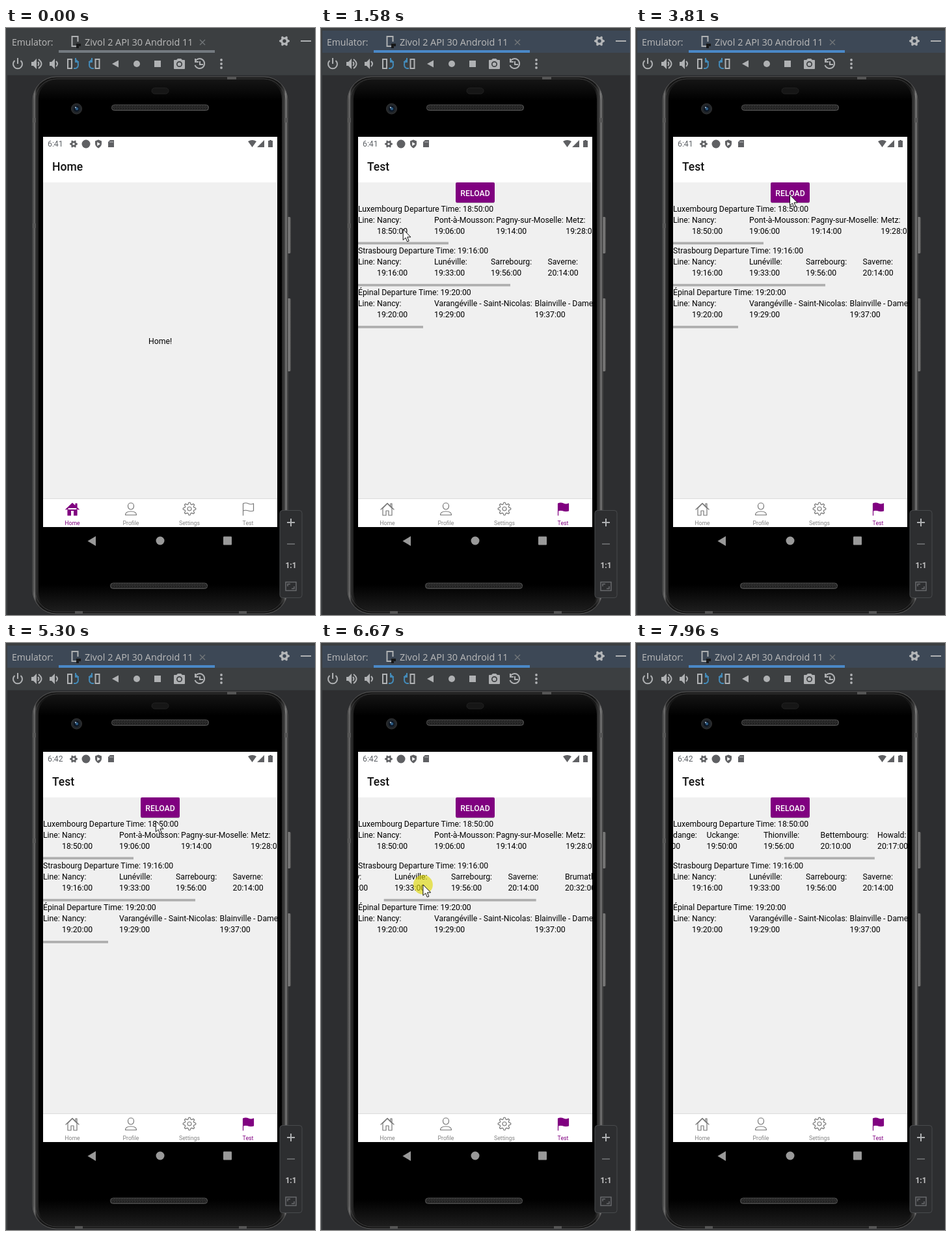
An HTML page for the animation above (8000 ms loop, 475 by 901 pixels).

```html
<!DOCTYPE html>
<html lang="en">
<head>
<meta charset="utf-8">
<title>Emulator</title>
<style>
  html, body { margin: 0; width: 100%; height: 100%; overflow: hidden; background: #2d2e30; }
  svg { display: block; }
  text { font-family: Roboto, sans-serif; font-size: 12.25px; white-space: pre; }
  .ide { font-family: "Open Sans", sans-serif; font-size: 14.4px; fill: #bbb; }
  .title { font-size: 17.5px; font-weight: 500; fill: #111; }
  .mid { text-anchor: middle; }
  .tab text { font-size: 8.75px; fill: #848484; text-anchor: middle; }
  .tab .icon { fill: none; stroke: #777; stroke-width: 1.2; stroke-linejoin: round; stroke-linecap: round; }
  .tab .hole { fill: #fff; stroke: none; display: none; }
  .tab.active text { fill: #800080; }
  .tab.active .icon { fill: #800080; stroke: #800080; }
  .tab.active .hole { display: block; }
  .line { fill: none; stroke: #afb1b3; stroke-width: 2; }
</style>
</head>
<body>
<svg id="stage" width="475" height="901" viewBox="0 0 475 901">
  <defs>
    <linearGradient id="rim">
      <stop offset="0" stop-color="#252525"/><stop offset=".007" stop-color="#777"/>
      <stop offset=".014" stop-color="#2b2b2b"/><stop offset=".03" stop-color="#161616"/>
      <stop offset=".97" stop-color="#161616"/><stop offset=".986" stop-color="#3a3a3a"/>
      <stop offset=".993" stop-color="#888"/><stop offset="1" stop-color="#252525"/>
    </linearGradient>
    <linearGradient id="glass" x2="0" y2="1">
      <stop offset="0" stop-color="#151515"/><stop offset=".04" stop-color="#000"/>
      <stop offset=".95" stop-color="#000"/><stop offset="1" stop-color="#1d1d1d"/>
    </linearGradient>
    <linearGradient id="key">
      <stop offset="0" stop-color="#333"/><stop offset=".6" stop-color="#858585"/><stop offset="1" stop-color="#444"/>
    </linearGradient>
    <pattern id="mesh" width="4" height="4.5" patternUnits="userSpaceOnUse">
      <path d="M0 0L2 2.25L0 4.5M2 0L4 2.25L2 4.5" fill="none" stroke="#666" stroke-width=".8"/>
    </pattern>
    <clipPath id="screen"><rect x="57" y="167" width="360" height="599"/></clipPath>
  </defs>

  <!-- tool window -->
  <rect width="475" height="73" fill="#3c3f41"/>
  <rect y="73" width="2" height="828" fill="#3c3f41"/>
  <rect id="header" x="2" y="4" width="473" height="34"/>
  <rect id="underline" x="81" y="34" width="240" height="4"/>
  <path d="M2 72.5H475" stroke="#323537"/>
  <text class="ide" x="9" y="27" style="font-size:14px">Emulator:</text>
  <text class="ide" x="121" y="27">Zivol 2 API 30 Android 11</text>
  <path d="M108 28H101.500V13H110.500V21" class="line" stroke-width="1.6"/>
  <path d="M108 24h7v4h-3v3h-4z" fill="#18191a"/>
  <path d="M298 18l8 8m0-8l-8 8" stroke="#73777a" stroke-width="1.3"/>
  <g id="options" transform="translate(428 20)" fill="#b4b6b8"></g>
  <path d="M453 20H469" class="line"/>

  <!-- emulator toolbar -->
  <path d="M13.500 50a7 7 0 1 0 9 0M18 46V55" class="line"/>
  <g fill="#afb1b3">
    <path id="speaker" d="M39 52h3l5-5v16l-5-5h-3z"/>
    <use href="#speaker" x="28"/>
    <path d="M173 49.500v11l-10-5.500z"/>
    <circle cx="201" cy="55" r="5"/>
    <rect x="228" y="50" width="10" height="10"/>
    <path d="M259 49h3l2-2h5l2 2h3a1 1 0 0 1 1 1v12a1 1 0 0 1-1 1h-15a1 1 0 0 1-1-1v-12a1 1 0 0 1 1-1z"/>
    <circle cx="331" cy="49" r="1.900"/><circle cx="331" cy="55" r="1.900"/><circle cx="331" cy="61" r="1.900"/>
  </g>
  <circle cx="266.500" cy="55.500" r="3.700" fill="#afb1b3" stroke="#3c3f41" stroke-width="1.700"/>
  <path d="M49 52q3 3 0 6M50 48q9 7 0 14M77 51q4 4 0 8" class="line" stroke-width="1.600"/>
  <path d="M95 48h6v14h-6zM137.500 48h6v14h-6z" class="line"/>
  <path d="M104 62h3q4-1 4-6t-4-7m0-3v6h5M135 62h-3q-4-1-4-6t4-7m0-3v6h-5" fill="none" stroke="#438ab8" stroke-width="2"/>
  <path d="M291 47v5h5M291 51a7.500 7.500 0 1 1-.5 6M298 51v5h5" class="line"/>

  <!-- phone -->
  <rect x="431" y="290" width="7" height="56" rx="2" fill="url(#key)"/>
  <rect x="431" y="415" width="7" height="112" rx="2" fill="url(#key)"/>
  <rect x="41" y="75" width="392" height="824" rx="36" fill="url(#rim)" stroke="#595959"/>
  <rect x="45" y="78" width="384" height="818" rx="33" fill="none" stroke="#3d3d3d"/>
  <rect x="50" y="79" width="374" height="816" rx="30" fill="url(#glass)"/>
  <path d="M41 138h5v7h-5zM428 138h5v7h-5zM41 300h5v7h-5zM340 75h14v4h-14zM106 895h12v4h-12zM358 895h12v4h-12z" fill="#555"/>
  <rect x="224" y="92" width="26" height="9" rx="4.500" fill="#161616" stroke="#222"/>
  <circle cx="108.500" cy="124" r="8" fill="#22262a" stroke="#353535"/>
  <circle cx="108.500" cy="124" r="4.500" fill="#0c1522"/>
  <circle cx="109" cy="124" r="2.300" fill="#29577e"/><circle cx="107" cy="122" r="1.200" fill="#9ab"/>
  <g fill="url(#mesh)" stroke="#555">
    <rect x="162.500" y="118" width="149" height="8.500" rx="4"/>
    <rect x="160.500" y="852" width="149" height="8.500" rx="4"/>
  </g>
  <g fill="#999">
    <path d="M138 780v15l-12.500-7.500z"/><circle cx="237" cy="787" r="6.500"/>
    <rect x="334" y="780.500" width="13" height="13" rx="1"/>
  </g>

  <!-- screen -->
  <g clip-path="url(#screen)">
    <rect x="57" y="167" width="360" height="599" fill="#fff"/>
    <rect x="57" y="237" width="360" height="486" fill="#f0f0f0"/>
    <text id="clock" x="64" y="182.300" fill="#5f6368"></text>
    <g fill="#5f6063">
      <g id="statusGear" transform="translate(104 178)"></g>
      <circle cx="123" cy="178" r="6.500"/>
      <path d="M142 171.500l5 2v4q0 4-5 7q-5-3-5-7v-4z"/>
      <path d="M160 172h6v11h-9v-8z"/>
      <path d="M372 174q6.500-4 13 0l-6.500 9zM397 172v11h-11zM403 173h2v-1h3v1h2v10h-7z"/>
    </g>
    <path d="M140.500 175.500l4 2.500-4 2.500zM160 174v2m2-2v2m2-2v2" fill="#fff" stroke="#fff" stroke-width=".6"/>
    <text id="title" class="title" x="71" y="219.300"></text>

    <text id="home" class="mid" x="237" y="485">Home!</text>
    <g id="test">
      <rect x="207" y="237" width="60" height="31" rx="2" fill="#800080"/>
      <path d="M208 268.500H266" stroke="#aaa" stroke-opacity=".7"/>
      <text class="mid" x="237" y="257.500" fill="#fff" font-weight="500">RELOAD</text>
      <text id="loading" class="mid" x="237" y="281.500">Loading...</text>
      <g id="list"></g>
    </g>

    <path d="M57 722.500H417" stroke="#dcdcdc"/>
    <g id="homeTab" class="tab">
      <path class="icon" d="M92 739l10-9.500 10 9.500M95 737v11h5v-7h4v7h5v-11M107 734v-4h2v6M95 737l7-7 7 7"/>
      <path class="hole" d="M100 741h4v8h-4z"/>
      <text x="102" y="763">Home</text>
    </g>
    <g class="tab">
      <path class="icon" d="M187.500 733.500a4.500 4.500 0 0 1 9 0q0 5-4.500 5.500q-4.500-.5-4.500-5.500zM183.500 747.500q0-5.500 8.500-5.500t8.500 5.500z"/>
      <text x="192" y="763">Profile</text>
    </g>
    <g class="tab">
      <g id="settings" class="icon" transform="translate(282 738)"></g>
      <text x="282" y="763">Settings</text>
    </g>
    <g id="testTab" class="tab">
      <path class="icon" d="M364.500 748v-18q4-2 8 0t8 0v11q-4 1.500-8 0t-8 0"/>
      <text x="372" y="763">Test</text>
    </g>
  </g>

  <!-- zoom panel -->
  <rect x="421" y="740.500" width="34" height="134" rx="4" fill="#2d2e30" stroke="#484a4c"/>
  <path d="M432 759h12m-6-6v12" class="line" stroke="#c4c4c4"/>
  <path d="M432 792h12" stroke="#636567" stroke-width="2"/>
  <text class="mid" x="438" y="828.500" fill="#c4c4c4" style="font-size:12px;font-weight:700">1:1</text>
  <path d="M430 850.500h16v13h-16zM433 857v-3.500h4M443 857v3.500h-4" fill="none" stroke="#686a6c" stroke-width="1.500"/>

  <g id="pointer">
    <circle id="press" r="15" fill="#ded900" fill-opacity=".62"/>
    <path d="M0 0V16.500L3.900 13L6.400 19L9 18L6.500 12H11.800Z" fill="#fff" stroke="#111"/>
  </g>
</svg>
<script>
const LOOP = 8000;
const $ = id => document.getElementById(id);
const show = (id, on) => { $(id).style.display = on ? '' : 'none'; };
const within = (t, from, to) => t >= from && t < to;

function gear(teeth, outer, inner, hole) {
  let d = '';
  for (let i = 0; i < teeth * 4; i++) {
    const a = (i - .5) * Math.PI / (teeth * 2), r = i % 4 < 2 ? outer : inner;
    d += `${i ? 'L' : 'M'}${(r * Math.cos(a)).toFixed(2)} ${(r * Math.sin(a)).toFixed(2)}`;
  }
  return `<path fill-rule="evenodd" d="${d}ZM${hole} 0A${hole} ${hole} 0 1 0 ${-hole} 0A${hole} ${hole} 0 1 0 ${hole} 0Z"/>`;
}
$('options').innerHTML = gear(6, 8, 5.8, 2.7);
$('statusGear').innerHTML = gear(6, 6, 4.3, 1.8);
$('settings').innerHTML = gear(8, 9.8, 7.2, 3);

// Each stop: left edge, name, time.
const routes = [
  { to: 'Luxembourg', leaves: '18:50:00', bar: 139, stops: [
    [86, 'Nancy', '18:50'], [174, 'Pont-à-Mousson', '19:06'], [269, 'Pagny-sur-Moselle', '19:14'],
    [376.3, 'Metz', '19:28'], [463.5, 'Hagondange', '19:44'], [551, 'Uckange', '19:50'],
    [638.5, 'Thionville', '19:56'], [726, 'Bettembourg', '20:10'], [813.5, 'Howald', '20:17']] },
  { to: 'Strasbourg', leaves: '19:16:00', bar: 234, stops: [
    [86, 'Nancy', '19:16'], [174, 'Lunéville', '19:33'], [261, 'Sarrebourg', '19:56'],
    [348.5, 'Saverne', '20:14'], [436, 'Brumath', '20:32'], [523.7, 'Strasbourg', '20:44']] },
  { to: 'Épinal', leaves: '19:20:00', bar: 100, stops: [
    [86, 'Nancy', '19:20'], [174, 'Varangéville - Saint-Nicolas', '19:29'],
    [328.5, 'Blainville - Damelevières', '19:37']] }
];
$('list').innerHTML = routes.map((r, i) => `<g transform="translate(0 ${i * 64.3})">
  <text x="57" y="281.500">${r.to} Departure Time: ${r.leaves}</text>
  <g id="row${i}"><text x="57" y="298.500">Line:</text>${r.stops.map(([x, name, time]) =>
    `<text x="${x}" y="298.500">${name}:</text><text x="${x}" y="315.700">${time}:00</text>`).join('')}</g>
  <rect id="bar${i}" x="57" y="328.500" width="${r.bar}" height="3.700" fill="#aeaeae"/></g>`).join('');

// Linear interpolation through [time, ...values] keys.
function track(t, keys) {
  const next = keys.findIndex(k => k[0] > t);
  if (next < 0) return keys[keys.length - 1].slice(1);
  if (next === 0) return keys[0].slice(1);
  const a = keys[next - 1], b = keys[next], p = (t - a[0]) / (b[0] - a[0]);
  return a.slice(1).map((v, i) => v + (b[i + 1] - v) * p);
}

const pointerPath = [
  [30, 69, 526], [690, 368, 738], [1070, 368, 738], [1310, 120, 318], [1579, 120, 318],
  [1580, 126, 309], [2200, 236.5, 256], [5299, 236.5, 256], [5300, 230, 273],
  [5580, 310, 371], [5650, 300, 371], [6060, 25, 371], [6100, 15, 371], [6390, 15, 371],
  [6800, 222, 371], [7040, 238, 308], [7100, 238, 308], [7340, 38, 308], [7470, -70, 308]
];
const presses = [[880, 930], [2200, 2340], [5650, 6860], [7080, 7470]];
const scrolls = [
  [[7100, 0], [7340, 192], [7470, 290], [7600, 360], [7760, 415], [7960, 442.5]],
  [[5660, 0], [5950, 194], [6390, 194], [6800, 0]],
  [[0, 0]]
];
const barFades = [
  [[5320, 1], [5570, 0], [7100, 0], [7101, 1]],
  [[5320, 1], [5570, 0], [5660, 0], [5661, 1], [7300, 1], [7340, .8], [7500, 0]],
  [[5320, 1], [5570, 0]]
];

function draw(t) {
  const focused = t >= 880, onTest = t >= 1070;
  const loading = within(t, 1070, 1310) || within(t, 2360, 3810);
  $('header').setAttribute('fill', focused ? '#3d4856' : '#3c3f41');
  $('underline').setAttribute('fill', focused ? '#4a88c7' : '#747a80');
  $('clock').textContent = t < 3950 ? '6:41' : '6:42';
  $('title').textContent = onTest ? 'Test' : 'Home';
  $('homeTab').classList.toggle('active', !onTest);
  $('testTab').classList.toggle('active', onTest);
  show('home', !onTest);
  show('test', onTest);
  show('loading', loading);
  show('list', !loading);

  routes.forEach((route, i) => {
    const [offset] = track(t, scrolls[i]);
    $('row' + i).setAttribute('transform', `translate(${-offset} 0)`);
    $('bar' + i).setAttribute('x', 57 + offset * route.bar / 360);
    $('bar' + i).setAttribute('opacity', track(t, barFades[i])[0]);
  });

  $('pointer').setAttribute('transform', `translate(${track(t, pointerPath).join(' ')})`);
  show('pointer', within(t, 30, 7470));
  show('press', presses.some(([from, to]) => within(t, from, to)));
}

const start = performance.now();
function frame() {
  draw((performance.now() - start) % LOOP);
  requestAnimationFrame(frame);
}
frame();
</script>
</body>
</html>
```
